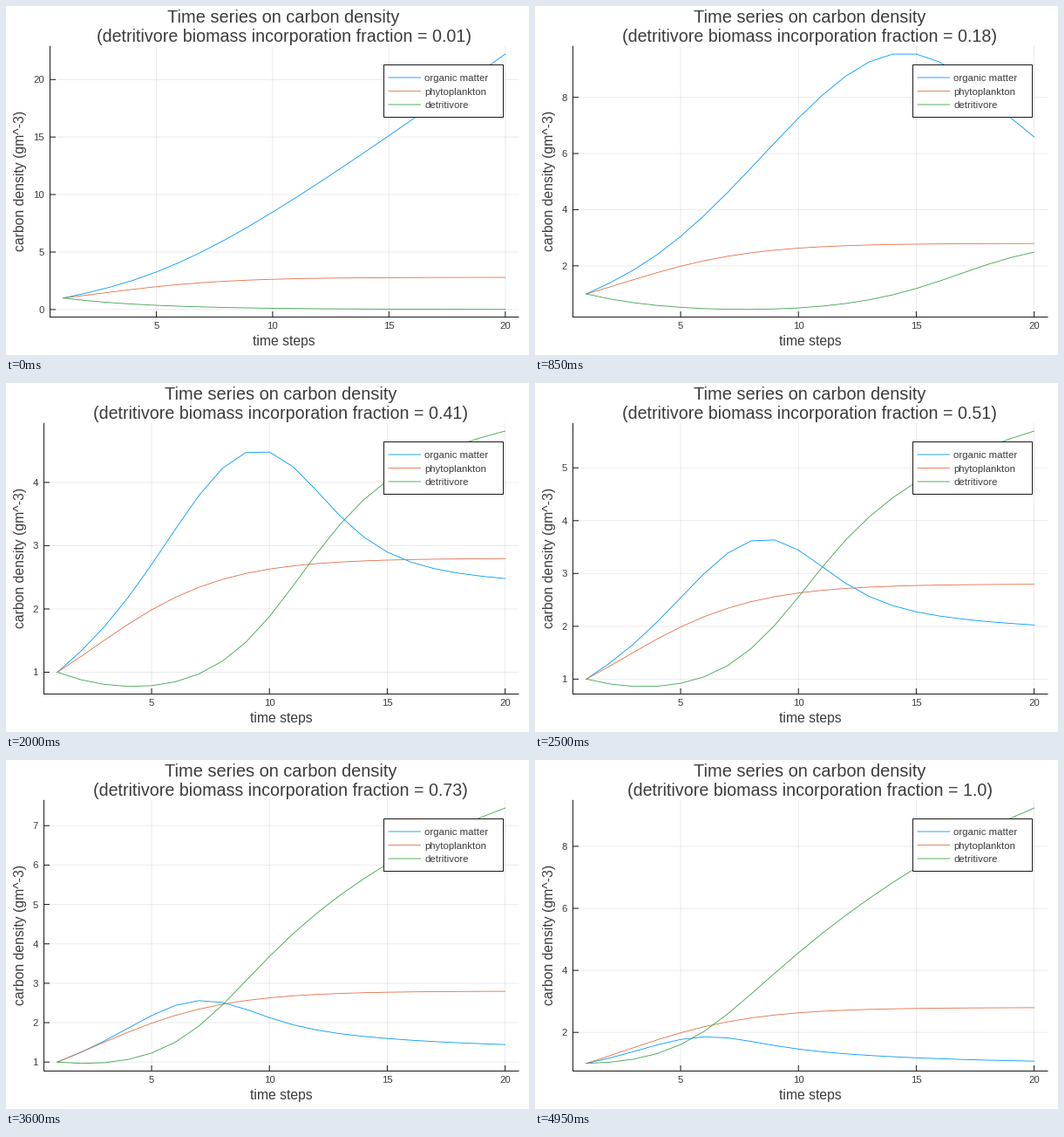
These frames come from a looping animation (600x400 px, 5 s). A matplotlib script:

```python
import numpy as np
import matplotlib.pyplot as plt
from matplotlib.animation import FuncAnimation
from matplotlib.patches import Rectangle

W, H, DPI = 600, 400, 100
FRAMES, INTERVAL = 100, 50
TOP, BOTTOM, RIGHT = 46.3, 356.5, 588
MARGIN = 0.03 / 1.06
INK, AXIS = "#3c3c3c", "#1a1a1a"
TITLE, GUIDE, SMALL = 20, 15.7, 11.4
SERIES = [("organic matter", "#009afa"),
          ("phytoplankton", "#e36f47"),
          ("detritivore", "#3ea44e")]
STEPS = np.arange(1, 21)
FRACTIONS = np.arange(1, FRAMES + 1) / 100

# model rates
GROWTH, DEATH_P, CROWDING = 0.526, 0.156, 0.37 / 2.8
INTAKE, RESPIRED, DEATH_D = 0.27, 0.118, 0.2553


def rates(state):
    matter, phyto, detri = state
    eaten = matter * detri
    gained = FRACTIONS * INTAKE * eaten
    lost_p = DEATH_P * phyto + CROWDING * phyto ** 2
    lost_d = DEATH_D * detri
    return np.array([lost_p + lost_d - gained - RESPIRED * eaten,
                     GROWTH * phyto - lost_p,
                     gained - lost_d])


def simulate(substeps=20):
    """Runge-Kutta for all fractions at once: (step, series, fraction)."""
    h = 1 / substeps
    state = np.ones((3, FRAMES))
    out = [state]
    for _ in STEPS[1:]:
        for _ in range(substeps):
            a = rates(state)
            b = rates(state + h / 2 * a)
            c = rates(state + h / 2 * b)
            d = rates(state + h * c)
            state = state + h / 6 * (a + 2 * b + 2 * c + d)
        out.append(state)
    return np.array(out)


def pick_ticks(lo, hi):
    """Best-scoring round ticks inside the range."""
    best, best_score = [], -1
    for scale in (0.1, 1, 10):
        for base, nice in ((1, 1), (5, 0.9), (2, 0.7), (2.5, 0.5), (3, 0.2)):
            step = base * scale
            first, last = np.ceil(lo / step), np.floor(hi / step)
            count = int(last - first) + 1
            if not 4 <= count <= 8:
                continue
            score = ((1 - abs(count - 5) / 5) / 4
                     + (first <= 0) / 6
                     + 0.5 * (hi - lo) / ((count - 1) * step)
                     + nice / 4)
            if score > best_score + 1e-9:
                best, best_score = np.arange(first, last + 1) * step, score
    return best


def tick_labels(ticks):
    whole = np.allclose(ticks, np.round(ticks))
    return [f"{t:.0f}" if whole else f"{t:.1f}" for t in np.abs(ticks)]


DATA = simulate()

fig = plt.figure(figsize=(W / DPI, H / DPI), dpi=DPI, facecolor="white")
ax = fig.add_axes([0, 0, 1, 1])


def text(x, y, s, px, ha="center", **kw):
    ax.text(x, y, s, fontsize=px * 72 / DPI, family="Liberation Sans",
            color=INK, ha=ha, va="baseline", **kw)


def line(xs, ys, color=AXIS, width=1.0, **kw):
    ax.plot(xs, ys, color=color, lw=width * 72 / DPI, snap=False, **kw)


def grid_line(xs, ys):
    line(xs, ys, "black", alpha=0.08)


def curve(xs, ys, color, zorder):
    line(xs, ys, color, 0.85, zorder=zorder)


def draw_legend():
    ax.add_patch(Rectangle((433.5, 67.5), 137, 60, fc="white", ec=AXIS,
                           lw=0.72, zorder=5, snap=False))
    for k, (name, color) in enumerate(SERIES):
        y = 82 + 15.5 * k
        curve([439, 475.5], [y, y], color, 6)
        text(480.5, y + 4, name, SMALL, ha="left", zorder=6)


def draw(i):
    ax.clear()
    ax.set_xlim(0, W)
    ax.set_ylim(H, 0)
    ax.axis("off")

    values = DATA[:, :, i]
    low, high = values.min(), values.max()
    pad = 0.03 * (high - low)
    ticks = pick_ticks(low - pad, high + pad)
    labels = tick_labels(ticks)
    left = 36.5 + max(7 * len(s) - 3.5 * ("." in s) for s in labels)
    span = RIGHT - left

    def px(t):
        return left + span * (MARGIN + (t - 1) / 19 / 1.06)

    def py(v):
        return BOTTOM - (BOTTOM - TOP) * (v - low + pad) / (high - low + 2 * pad)

    for t in (5, 10, 15, 20):
        x = px(t)
        grid_line([x, x], [TOP, BOTTOM])
        line([x, x], [BOTTOM - 6, BOTTOM])
        text(x, 370, str(t), SMALL)
    for v, label in zip(ticks, labels):
        y = py(v)
        grid_line([left, RIGHT], [y, y])
        line([left, left + 6], [y, y])
        text(left - 6.7, y + 4, label, SMALL, ha="right")
    line([left, left], [TOP, BOTTOM])
    line([left, RIGHT], [BOTTOM, BOTTOM])

    for k, (_, color) in enumerate(SERIES):
        curve(px(STEPS), py(values[:, k]), color, 3)
    draw_legend()

    mid = (left + RIGHT) / 2 - 0.7
    text(mid, 19, "Time series on carbon density", TITLE)
    text(mid, 41, "(detritivore biomass incorporation fraction = "
         f"{round(FRACTIONS[i], 2)})", TITLE - 0.3)
    text(mid + 0.5, 389, "time steps", GUIDE)
    text(21.4, 200.7, "carbon density (gm^-3)", GUIDE, rotation=90,
         rotation_mode="anchor")
    return []


anim = FuncAnimation(fig, draw, frames=FRAMES, interval=INTERVAL,
                     init_func=lambda: draw(0), repeat=True, repeat_delay=0)
plt.show()
```
